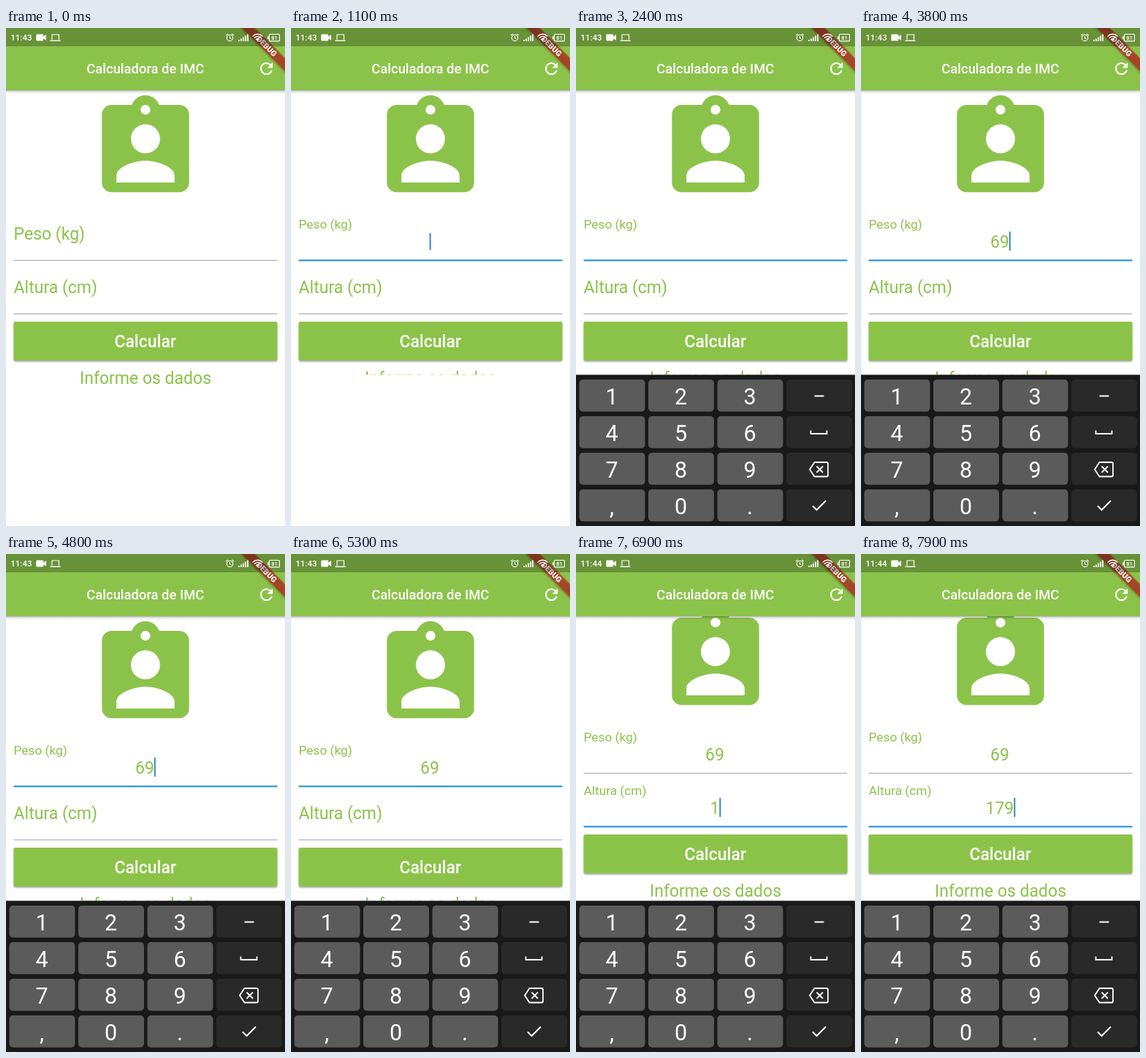
Animation of 382x680 px, one loop 8 s. Source, as an HTML page:

```html
<!DOCTYPE html>
<html lang="pt">
<head>
<meta charset="utf-8">
<title>Calculadora de IMC</title>
<style>
  html, body { margin: 0; width: 100%; height: 100%; overflow: hidden; background: #fff; }
  svg { display: block; width: 100vw; height: 100vh; font-family: Roboto, "Noto Sans", sans-serif; }
  .green { fill: #8bc34a; }
  .body { font-size: 23px; }
  .mid { text-anchor: middle; }
  .medium { font-weight: 500; }
  .stroke { fill: none; stroke: #fff; }
</style>
</head>
<body>
<svg viewBox="0 0 382 680" preserveAspectRatio="none">
  <defs>
    <clipPath id="view"><rect id="viewRect" y="85" width="382" height="595"/></clipPath>
    <linearGradient id="shade" x2="0" y2="1">
      <stop offset="0" stop-color="#000" stop-opacity=".3"/>
      <stop offset=".4" stop-color="#000" stop-opacity=".1"/>
      <stop offset="1" stop-color="#000" stop-opacity="0"/>
    </linearGradient>
    <filter id="lift" x="-5%" y="-20%" width="110%" height="150%">
      <feDropShadow dx="0" dy="1.6" stdDeviation="1.2" flood-opacity=".38"/>
    </filter>
  </defs>
  <rect width="382" height="680" fill="#fff"/>

  <g clip-path="url(#view)">
    <g id="page">
      <path class="green" transform="translate(111.4 85) scale(6.633)" d="M19 3h-4.18C14.4 1.84 13.3 1 12 1s-2.4.84-2.82 2H5c-1.1 0-2 .9-2 2v14c0 1.1.9 2 2 2h14c1.1 0 2-.9 2-2V5c0-1.1-.9-2-2-2zm-7 0c.55 0 1 .45 1 1s-.45 1-1 1-1-.45-1-1 .45-1 1-1zm0 4c1.66 0 3 1.34 3 3s-1.34 3-3 3-3-1.34-3-3 1.34-3 3-3zm6 12H6v-1.4c0-2 4-3.1 6-3.1s6 1.1 6 3.1V19z"/>
      <g id="fields" class="green body"></g>
      <rect class="green" x="10.5" y="401" width="361" height="53" rx="2" filter="url(#lift)"/>
      <text class="body mid medium" x="190.7" y="435.5" fill="#fff">Calcular</text>
      <text class="green body mid" x="191" y="486">Informe os dados</text>
    </g>
    <rect y="85" width="382" height="5" fill="url(#shade)"/>
  </g>

  <rect class="green" width="382" height="85"/>
  <text class="mid medium" x="190.8" y="62" font-size="18.4" fill="#fff">Calculadora de IMC</text>
  <path transform="translate(343.7 42.7) scale(1.07)" fill="#fff" d="M17.65 6.35C16.2 4.9 14.21 4 12 4c-4.42 0-7.99 3.58-7.99 8s3.57 8 7.99 8c3.73 0 6.84-2.55 7.73-6h-2.08c-.82 2.33-3.04 4-5.65 4-3.31 0-6-2.69-6-6s2.69-6 6-6c1.66 0 3.14.69 4.22 1.78L13 11h7V4l-2.35 2.35z"/>

  <g transform="translate(357 25) rotate(45)">
    <rect x="-60" y="-6.4" width="120" height="12.8" fill="#b71c1c" fill-opacity=".66" filter="url(#lift)"/>
    <text class="mid" y="3.8" font-size="10.6" font-weight="900" fill="#fff">DEBUG</text>
  </g>
  <rect width="382" height="25" fill="#000" fill-opacity=".25"/>

  <g fill="#fff">
    <text id="clock" class="medium" x="6.3" y="17" font-size="11.5"></text>
    <path d="M42.5 8.5h7.5q1.2 0 1.2 1.2v2l3.8-2.7v8l-3.8-2.7v2q0 1.2-1.2 1.2h-7.5q-1.2 0-1.2-1.2V9.7q0-1.2 1.2-1.2z"/>
    <path d="M60.5 16.6h14v1.4h-14z"/>
    <path class="stroke" stroke-width="1.2" d="M63 16V9h9.5v7"/>
    <g class="stroke">
      <circle cx="306.5" cy="13.4" r="4.2" stroke-width="1.1"/>
      <path stroke-width="1.1" d="M306.5 11v2.8l2 1.2M301.2 10l2.6-2.2M311.8 10l-2.6-2.2"/>
      <path stroke-width="1.7" d="M319 18v-2M322 18v-3.6M325 18v-5.4M328 18v-7.4M331 18V8.4"/>
      <path stroke-width="1.3" d="M337.5 11.5q7-6.5 14 0M339.7 13.8q4.8-4.6 9.6 0M342 16q2.5-2.4 5 0"/>
      <rect x="360.5" y="8.5" width="14" height="9.4" rx="1" stroke-width="1.1"/>
      <path stroke-width="1.6" d="M358.9 11.2v4"/>
    </g>
    <circle cx="344.5" cy="17.3" r="1"/>
    <text class="mid medium" x="367.5" y="16" font-size="7.6">81</text>
  </g>

  <g id="keyboard">
    <rect y="473.5" width="382" height="207" fill="#191919"/>
    <g id="keys" class="mid" font-size="30.5" fill="#fff"></g>
    <path class="stroke" stroke-width="2" d="M326.5 502.5h13"/>
    <path class="stroke" stroke="#ddd" stroke-width="1.8" d="M321.5 549.5v4.5h22v-4.5"/>
    <path class="stroke" stroke-width="1.8" d="M326.5 593h16.5q2 0 2 2v15.5q0 2-2 2h-16.5l-6.5-9.8zM329.5 598.5l8.5 8.5M338 598.5l-8.5 8.5"/>
    <path class="stroke" stroke-width="2" d="M324 652.5l5.5 5.5 12.5-12.5"/>
  </g>
</svg>
<script>
const LOOP = 8000, SCROLL = 18, ROW = 73, SIZE = 23, DIGIT = 0.5615;
const FOCUS_WEIGHT = 900, FOCUS_HEIGHT = 5930;
const INSET_AT = 1050, CLOCK_AT = 6600;
const $ = id => document.getElementById(id);

function add(parent, tag, attrs, text = '') {
  const el = document.createElementNS('http://www.w3.org/2000/svg', tag);
  for (const name in attrs) el.setAttribute(name, attrs[name]);
  el.textContent = text;
  parent.appendChild(el);
  return el;
}

const mix = (a, b, p) => a + (b - a) * p;
function ease(t, start, length) {
  const p = Math.min(1, Math.max(0, (t - start) / length));
  return p * p * (3 - 2 * p);
}
const mixColor = (a, b, p) => `rgb(${a.map((v, i) => Math.round(mix(v, b[i], p)))})`;

['123', '456', '789', ',0. '].forEach((row, r) => {
  const y = 480 + r * 50;
  for (let c = 0; c < 4; c++) {
    const x = 4.5 + c * 94.5;
    add($('keys'), 'rect', { x, y, width: 90, height: 43.8, rx: 5, fill: c < 3 ? '#5b5b5b' : '#292929' });
    if (c < 3) add($('keys'), 'text', { x: x + 44.5, y: y + 33.5 }, row[c]);
  }
});

function makeField(label, top, focus, blur, strokes) {
  const g = add($('fields'), 'g', { transform: `translate(0 ${top})` });
  const line = add(g, 'rect', { x: 10.5, width: 361 });
  const title = add(g, 'text', {}, label);
  const value = add(g, 'text', { class: 'mid', x: 189.9, y: 300 });
  const caret = add(g, 'rect', { width: 2, fill: '#3487cb' });

  return t => {
    const float = ease(t, focus, 200);
    const active = float - ease(t, blur, 200);
    title.setAttribute('transform',
      `translate(10.6 ${mix(289, 273.5, float)}) scale(${mix(1, 0.75, float)})`);

    const weight = mix(1, 2.2, active);
    line.setAttribute('y', 317.3 - weight / 2);
    line.setAttribute('height', weight);
    line.setAttribute('fill', mixColor([160, 160, 160], [43, 149, 222], active));

    const typed = strokes.filter(([at]) => t >= at);
    value.textContent = typed.map(([, digit]) => digit).join('');

    // Each keystroke restarts the blink.
    const since = t - (typed.length ? typed[typed.length - 1][0] : focus);
    const shown = t >= focus && t < blur && since % 1000 < 500;
    const filled = typed.length > 0;
    caret.setAttribute('visibility', shown ? 'visible' : 'hidden');
    caret.setAttribute('x', 189.6 + typed.length * SIZE * DIGIT / 2 + (filled ? 0.3 : 0));
    caret.setAttribute('y', filled ? 278 : 280);
    caret.setAttribute('height', filled ? 26 : 23);
  };
}

const fields = [
  makeField('Peso (kg)', 0, FOCUS_WEIGHT, FOCUS_HEIGHT, [[2900, '6'], [3400, '9']]),
  makeField('Altura (cm)', ROW, FOCUS_HEIGHT, Infinity, [[6700, '1'], [7100, '7'], [7500, '9']])
];

function draw(t) {
  fields.forEach(update => update(t));
  $('page').setAttribute('transform', `translate(0 ${-SCROLL * ease(t, 5880, 100)})`);
  $('viewRect').setAttribute('height', t < INSET_AT ? 595 : 388.5);
  $('keyboard').setAttribute('transform', `translate(0 ${207 * (1 - ease(t, 1150, 250))})`);
  $('clock').textContent = t < CLOCK_AT ? '11:43' : '11:44';
}

const start = performance.now();
function tick() {
  draw((performance.now() - start) % LOOP);
  requestAnimationFrame(tick);
}
tick();
</script>
</body>
</html>
```
